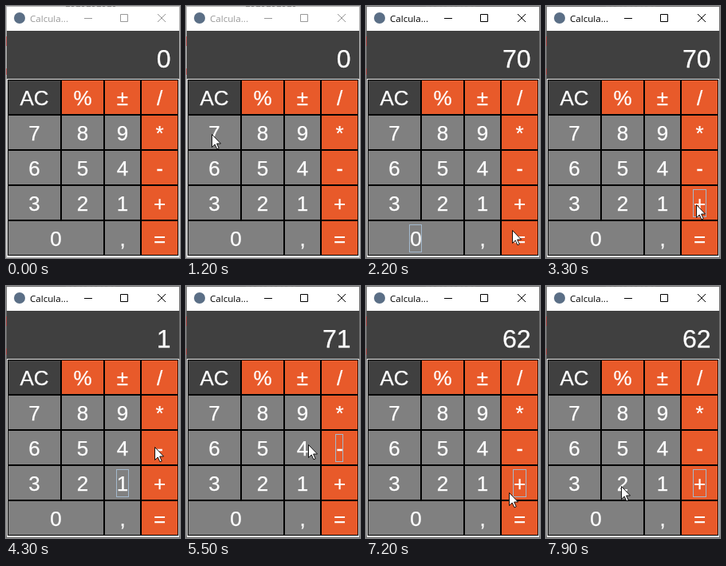
Animation, 218 px wide and 315 px high, one loop 8 s. Source, as an HTML page:

```html
<!DOCTYPE html>
<html lang="en">
<head>
<meta charset="utf-8">
<title>Calculator</title>
<style>
  html, body { margin: 0; width: 100%; height: 100%; overflow: hidden; background: #fff; }
  svg { display: block; width: 100%; height: 100%; }
  text { font-family: "Liberation Sans", Arial, sans-serif; fill: #fff; }
  .key, .display { stroke: #fff; stroke-width: 0.25px; }
  .key { font-size: 26px; text-anchor: middle; }
  .display { font-size: 32px; text-anchor: end; }
  .title { font: 11.6px "Open Sans", "Noto Sans", sans-serif; }
</style>
</head>
<body>
<svg id="stage" viewBox="0 0 218 315"></svg>
<script>
const LOOP = 8000, STEP = 100;
const DARK = '#404040', GRAY = '#808080', ORANGE = '#e85a2a', PRESSED = '#b8cfe5';
const stage = document.getElementById('stage');

function add(tag, attrs, label) {
  const el = document.createElementNS('http://www.w3.org/2000/svg', tag);
  for (const k in attrs) el.setAttribute(k, attrs[k]);
  if (label) el.textContent = label;
  stage.appendChild(el);
  return el;
}
const rect = (x, y, width, height, fill) => add('rect', { x, y, width, height, fill });

// Window
rect(0, 0, 218, 315, '#fff');
const frame = add('rect', { x: 0.5, y: 0.5, width: 217, height: 314, fill: 'none' });
add('path', { d: 'M75 .5H139', stroke: '#777', 'stroke-dasharray': '5 2 3 3' });
add('path', { d: 'M.5 38V50M.5 78V86', stroke: '#d33', 'stroke-opacity': 0.6 });
add('circle', { cx: 17, cy: 15, r: 7, fill: '#5b6f86' });
const title = add('text', { class: 'title', x: 30, y: 20 }, 'Calcula...');
const controls = add('path', {
  d: 'M98 15.5H108M143.5 10.5h9v9h-9ZM190 10l10 10M200 10l-10 10', fill: 'none'
});
rect(1, 31, 216, 60, DARK);
rect(1, 91, 216, 223, '#eee');
const display = add('text', { class: 'display', x: 206.5, y: 77 });

// Keys
const COLS = [2, 69, 123, 169, 216];
const ROWS = ['AC % ± /', '7 8 9 *', '6 5 4 -', '3 2 1 +', '0 0 , ='];
const FOCUS_W = { '-': 9, '+': 16 };
const keys = {};

function addKey(label, row, from, to) {
  const x = COLS[from], w = COLS[to] - x, y = 92 + row * 44;
  const fill = label === 'AC' ? DARK : /[\d,]/.test(label) ? GRAY : ORANGE;
  const box = add('rect', { x: x + 0.5, y: y + 0.5, width: w - 1, height: 43, fill, stroke: '#000' });
  const cx = x + w / 2, fw = FOCUS_W[label] || 15;
  add('text', { class: 'key', x: cx, y: y + 32 }, label);
  const ring = add('rect', {
    x: Math.floor(cx - fw / 2 - 0.5) + 0.5, y: y + 5.5, width: fw, height: 34, fill: 'none', stroke: '#a3b8cc'
  });
  keys[label] = { box, ring, fill };
}
ROWS.forEach((line, row) => {
  const labels = line.split(' ');
  for (const label of new Set(labels)) {
    addKey(label, row, labels.indexOf(label), labels.lastIndexOf(label) + 1);
  }
});

const cursor = add('path', {
  d: 'M.5 .5V16.5L4.2 13L6.9 18.8L9.2 17.8L6.6 12H11.5Z', fill: '#fff', stroke: '#000', 'stroke-width': 0.9
});

// Clicks: key, time pressed, time released
const CLICKS = [
  ['7', 1400, 1500], ['0', 2100, 2200], ['+', 3200, 3200], ['1', 3700, 3900],
  ['-', 4900, 5200], ['9', 5900, 6100], ['+', 6900, 7100]
];

// Pointer moves: start, end, x and y reached
const MOVES = [
  [100, 500, 42, 181], [600, 1200, 32, 160], [1500, 1800, 73, 284],
  [2100, 2200, 183, 280], [2200, 2300, 222, 262], [2400, 3100, 188, 248],
  [3400, 3600, 150, 251], [4000, 4300, 186, 201], [5400, 5500, 153, 198],
  [5500, 5700, 147, 163], [6200, 6600, 179, 258], [7200, 7500, 77, 253], [7600, 7900, 94, 250]
];

function tipAt(t) {
  let x = 24, y = -30;
  for (const [start, end, toX, toY] of MOVES) {
    const k = Math.min(1, Math.max(0, (t - start) / (end - start)));
    x += (toX - x) * k;
    y += (toY - y) * k;
  }
  return [Math.round(x), Math.round(y)];
}

// Replays the clicks made up to time t
function calcAt(t) {
  let value = 0, total = 0, sign = 1, fresh = true, focus = '', pressed = '';
  for (const [key, down, up] of CLICKS) {
    if (t < down) break;
    focus = key;
    if (t < up) {
      pressed = key;
    } else if (/\d/.test(key)) {
      value = (fresh ? 0 : value * 10) + Number(key);
      fresh = false;
    } else {
      total += sign * value;
      value = total;
      sign = key === '-' ? -1 : 1;
      fresh = true;
    }
  }
  return { value, focus, pressed };
}

function render(ms) {
  const t = Math.floor((ms % LOOP) / STEP) * STEP;
  const { value, focus, pressed } = calcAt(t);
  const active = focus !== '';
  display.textContent = value;
  for (const label in keys) {
    const { box, ring, fill } = keys[label];
    box.setAttribute('fill', label === pressed ? PRESSED : fill);
    ring.setAttribute('visibility', label === focus ? 'visible' : 'hidden');
  }
  title.style.fill = active ? '#000' : '#999';
  controls.setAttribute('stroke', active ? '#000' : '#999');
  frame.setAttribute('stroke', active ? '#707070' : '#b4b4b4');
  cursor.setAttribute('transform', `translate(${tipAt(t)})`);
}

const start = performance.now();
function tick() {
  render(performance.now() - start);
  requestAnimationFrame(tick);
}
tick();
</script>
</body>
</html>
```
